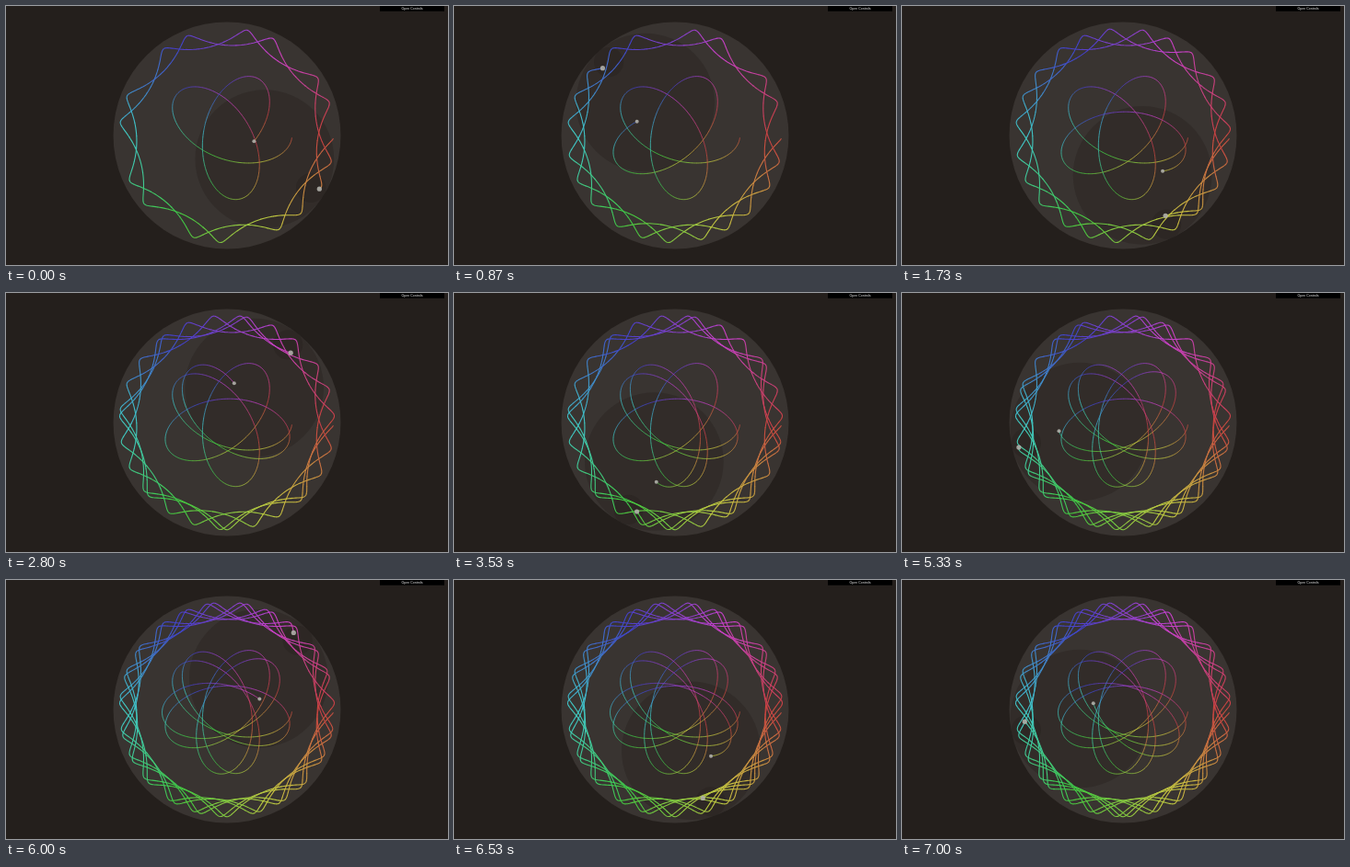
An HTML page with a canvas for the animation above (7070 ms loop, 480 by 282 pixels).

```html
<!DOCTYPE html>
<html lang="en">
<head>
<meta charset="utf-8">
<title>Spirograph</title>
<style>
  html, body { margin: 0; width: 100%; height: 100%; overflow: hidden; background: #241f1c; }
  canvas { display: block; }
</style>
</head>
<body>
<canvas id="stage" width="480" height="282"></canvas>
<script>
const ctx = document.getElementById('stage').getContext('2d');
const LOOP = 7070;
const FPS = 15;
const CENTER = { x: 240, y: 141 };
const RING = 123.5;
const START = 4;

// Each gear rolls inside the ring and carries a pen at some arm length.
const gears = [
  { radius: RING * 0.61, arm: 22.4, width: 0.8, dot: 2 },
  { radius: RING * 0.13, arm: 9.3, width: 1.1, dot: 2.6 }
];

// Rolling angle in degrees at a few steps of the loop.
const pace = [[0, 752], [26, 1144], [42, 1388], [65, 1743.5], [80, 1968], [90, 2115.5], [105, 2328]];

function angleAt(step) {
  let i = 1;
  while (i < pace.length - 1 && step > pace[i][0]) i++;
  const [s0, a0] = pace[i - 1];
  const [s1, a1] = pace[i];
  return a0 + (a1 - a0) * (step - s0) / (s1 - s0);
}

function gearCenter(gear, degrees) {
  const a = degrees * Math.PI / 180;
  const reach = RING - gear.radius;
  return { x: CENTER.x + reach * Math.cos(a), y: CENTER.y + reach * Math.sin(a) };
}

function penAt(gear, degrees) {
  const c = gearCenter(gear, degrees);
  const spin = degrees * Math.PI / 180 * (1 - RING / gear.radius);
  return { x: c.x + gear.arm * Math.cos(spin), y: c.y + gear.arm * Math.sin(spin) };
}

function disc(p, radius, color) {
  ctx.fillStyle = color;
  ctx.beginPath();
  ctx.arc(p.x, p.y, radius, 0, Math.PI * 2);
  ctx.fill();
}

function drawTrail(gear, end) {
  const chunk = 5;
  ctx.lineWidth = gear.width;
  ctx.lineJoin = 'round';
  for (let from = START; from < end; from += chunk) {
    const to = Math.min(from + chunk + 0.2, end);
    ctx.strokeStyle = `hsl(${(from + chunk / 2) % 360}, 55%, 52%)`;
    ctx.beginPath();
    for (let i = 0; i <= chunk; i++) {
      const p = penAt(gear, from + (to - from) * i / chunk);
      ctx.lineTo(p.x, p.y);
    }
    ctx.stroke();
  }
}

function drawButton() {
  ctx.fillStyle = '#000';
  ctx.fillRect(406, 0, 70, 5.7);
  ctx.fillStyle = '#eee';
  ctx.font = '3.6px "Liberation Sans", Arial, sans-serif';
  ctx.textAlign = 'center';
  ctx.fillText('Open Controls', 441, 3.9);
}

function draw(step) {
  const angle = angleAt(step);
  ctx.fillStyle = '#241f1c';
  ctx.fillRect(0, 0, 480, 282);
  disc(CENTER, RING, '#393431');
  gears.forEach(g => disc(gearCenter(g, angle), g.radius, 'rgba(36, 31, 28, 0.36)'));
  gears.forEach(g => drawTrail(g, angle));
  gears.forEach(g => disc(penAt(g, angle), g.dot, 'rgba(176, 176, 170, 0.9)'));
  drawButton();
}

const begin = performance.now();
let shown = -1;

function tick() {
  const time = Math.max(0, performance.now() - begin) % LOOP;
  const step = Math.min(105, Math.floor((time + 3.5) * FPS / 1000));
  if (step !== shown) draw(shown = step);
  requestAnimationFrame(tick);
}
tick();
</script>
</body>
</html>
```
